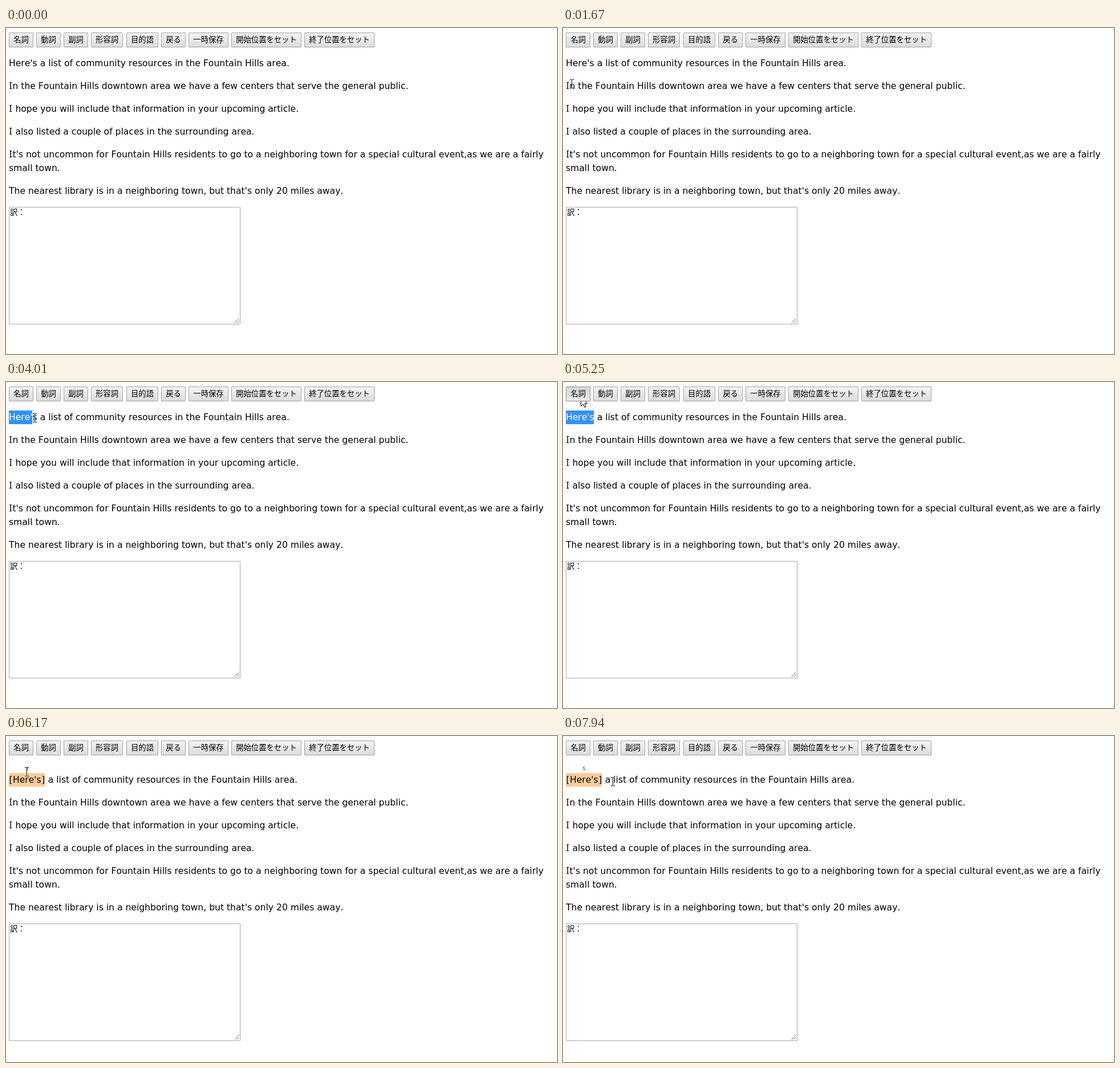
An HTML page that plays this animation: 966 by 572 pixels, repeating every 8000 ms.

```html
<!DOCTYPE html>
<html lang="ja">
<head>
<meta charset="utf-8">
<style>
html, body { margin: 0; width: 966px; height: 572px; overflow: hidden; background: #fff; }
#stage { position: relative; width: 966px; height: 572px; overflow: hidden; background: #fff;
  isolation: isolate; color: #000; font: 15.6px/24px "DejaVu Sans", sans-serif; font-kerning: none; }
#stage div { position: absolute; box-sizing: border-box; white-space: pre; }
.line { left: 5px; height: 24px; }
.line i { font: normal 15.8px/0 "Noto Sans", sans-serif; padding: 0 .57px; }
.line b { display: inline-block; width: 7px; font-weight: 400; text-align: center; }
.btn, #area { font: 13.33px/21px "Noto Sans CJK JP", "Noto Sans CJK", sans-serif; }
.btn { top: 8px; height: 26px; text-align: center; border: 1px solid #a3a3a3; border-radius: 1px;
  background: linear-gradient(#f3f3f3, #ebebeb 38%, #dcdcdc); }
.btn.hover { border-color: #8c8c8c; background: linear-gradient(#f8f8f8, #f0f0f0 38%, #e0e0e0); }
.btn.down { border-color: #8c8c8c; background: linear-gradient(#d8d8d8, #dedede 38%, #ececec); }
#page { left: 0; top: 0; width: 966px; height: 572px; }
#area { left: 5px; top: 314px; width: 406px; height: 206px; border: 1px solid #a9a9a9;
  padding-left: 1px; line-height: 15px; background: #fff; }
#area svg { position: absolute; right: 1px; bottom: 1px; }
#sel { left: 5px; top: 50px; height: 24px; overflow: hidden; background: #3390ff; color: #fff; }
#mark { left: 5px; top: 50px; width: 63px; height: 24px; background: #fc9; }
#ruby { left: 33px; top: 46px; width: 7px; text-align: center; font-size: 11px; line-height: 22px; color: #5c524a; }
#beam, #arrow { position: absolute; left: 0; top: 0; }
#beam { mix-blend-mode: difference; }
</style>
</head>
<body>
<div id="stage">
  <div id="page">
    <div id="mark"></div>
    <div id="area">訳：<svg width="9" height="9"><path d="M.5 8.5l8-8M4.5 8.5l4-4" stroke="#777" fill="none"/></svg></div>
  </div>
  <div id="sel">Here's</div>
  <div id="ruby">s</div>
  <svg id="beam" width="7" height="16"><path d="M0 0h3v1h1V0h3v1H4v14h3v1H4v-1H3v1H0v-1h3V1H0z" fill="#fff"/></svg>
  <svg id="arrow" width="13" height="20"><path d="M.5 .5V16.4L4.3 12.8 6.8 18.5 9.3 17.4 6.8 11.8H11.6Z" fill="#fff" stroke="#000"/></svg>
</div>
<script>
const LOOP = 8000, CLICK = 5250, APPLIED = 5310, SHIFT = 15;
const $ = id => document.getElementById(id);

function add(parent, cls, style, html) {
  const el = document.createElement('div');
  el.className = cls;
  el.style.cssText = style;
  el.innerHTML = html;
  parent.appendChild(el);
  return el;
}

// label, left, width
const buttons = [
  ['名詞', 5, 43], ['動詞', 53, 43], ['副詞', 101, 43], ['形容詞', 149, 56], ['目的語', 211, 56],
  ['戻る', 272, 43], ['一時保存', 320, 70], ['開始位置をセット', 395, 123], ['終了位置をセット', 523, 123]
].map(([label, x, w]) => add($('stage'), 'btn', `left:${x}px;width:${w}px`, label));

// top, right edge, text
const lines = [
  [50, 495, "Here's a list of community resources in the Fountain Hills area."],
  [90, 705, 'In the Fountain Hills downtown area we have a few centers that serve the general public.'],
  [130, 512, 'I hope you will include that information in your upcoming article.'],
  [170, 434, 'I also listed a couple of places in the surrounding area.'],
  [210, 942, "It's not uncommon for Fountain Hills residents to go to a neighboring town for a special cultural event,as we are a fairly"],
  [234, 95, 'small town.'],
  [274, 591, "The nearest library is in a neighboring town, but that's only 20 miles away."]
];
const rows = lines.map(([y, , text]) =>
  add($('page'), 'line', `top:${y}px`, text.replace(/\bI/g, '<i>I</i>')));
const plain = lines[0][2];
const tagged = plain.replace("Here's", "<b>[</b>Here's<b>]</b>");

// Pointer strokes: start, end, number of samples, waypoints
const strokes = [
  [290, 750, 7, [[56.5, 147]]],
  [900, 900, 1, [[55, 155]]],
  [970, 1670, 10, [[15.5, 98]]],
  [1750, 2130, 6, [[12.5, 73]]],
  [2300, 2370, 2, [[11.5, 70]]],
  [2540, 2540, 1, [[10.5, 70]]],
  [2770, 2840, 2, [[9.5, 68]]],
  [3070, 3150, 2, [[8.5, 65]]],
  [3480, 4010, 8, [[50.5, 63]]],
  [4160, 4160, 1, [[52.5, 63]]],
  [4310, 4310, 1, [[53.5, 63]]],
  [4790, 5180, 6, [[31, 26]]],
  [5540, 6170, 9, [[36.5, 63]]],
  [6240, 6310, 2, [[41, 99]]],
  [6400, 7180, 11, [[85, 94], [118, 97], [75, 101]]],
  [7260, 7260, 1, [[69, 102]]],
  [7340, 7490, 3, [[117, 91]]],
  [7720, 7940, 4, [[87.5, 80]]]
];
const START = [990, 629];

function along(pts, u) {
  const s = u * (pts.length - 1), i = Math.min(Math.floor(s), pts.length - 2), f = s - i;
  return [0, 1].map(k => pts[i][k] + (pts[i + 1][k] - pts[i][k]) * f);
}

function pointer(t) {
  let pos = START;
  for (const [t0, t1, n, pts] of strokes) {
    if (t < t0) break;
    const k = t >= t1 ? n : Math.floor((t - t0) / (t1 - t0) * (n - 1)) + 1;
    pos = along([pos, ...pts], k / n);
  }
  return pos;
}

function overText(x, y, applied) {
  if (applied) {
    if (y >= 50 && y < 65 && x < 68) return true;
    y -= SHIFT;
  }
  return lines.some(([top, right]) => x >= 5 && x < right && y >= top && y < top + 24)
    || (x >= 5 && x < 411 && y >= 314 && y < 520);
}

// Right edges of the selectable letters
const edges = [5, 16.7, 26.3, 32.7, 42.3, 46, 54];
function selectedTo(x) {
  let end = edges[0];
  for (let i = 1; i < edges.length; i++)
    if (x > (edges[i - 1] + edges[i]) / 2 + 3) end = edges[i];
  return end;
}

let wasApplied = null;
function draw(t) {
  const applied = t >= APPLIED;
  if (applied !== wasApplied) {
    rows[0].innerHTML = applied ? tagged : plain;
    $('page').style.top = (applied ? SHIFT : 0) + 'px';
    $('mark').style.display = $('ruby').style.display = applied ? '' : 'none';
    wasApplied = applied;
  }

  const [x, y] = pointer(t);
  const picking = t >= 3480 && !applied;
  const end = !picking ? 5 : t >= 4310 ? 54 : selectedTo(x);
  $('sel').style.width = end - 5 + 'px';

  const hover = y >= 8 && y < 34 && x >= 5 && x < 48;
  buttons[0].className = 'btn' + (hover ? t >= CLICK && !applied ? ' down' : ' hover' : '');

  const shown = t >= 290, text = overText(x, y, applied);
  $('beam').style.display = shown && text ? '' : 'none';
  $('arrow').style.display = shown && !text ? '' : 'none';
  $('beam').style.transform = `translate(${Math.round(x - 3.5)}px,${Math.round(y - 8)}px)`;
  $('arrow').style.transform = `translate(${Math.round(x)}px,${Math.round(y)}px)`;
}

function tick() {
  draw(performance.now() % LOOP);
  requestAnimationFrame(tick);
}
tick();
</script>
</body>
</html>
```
